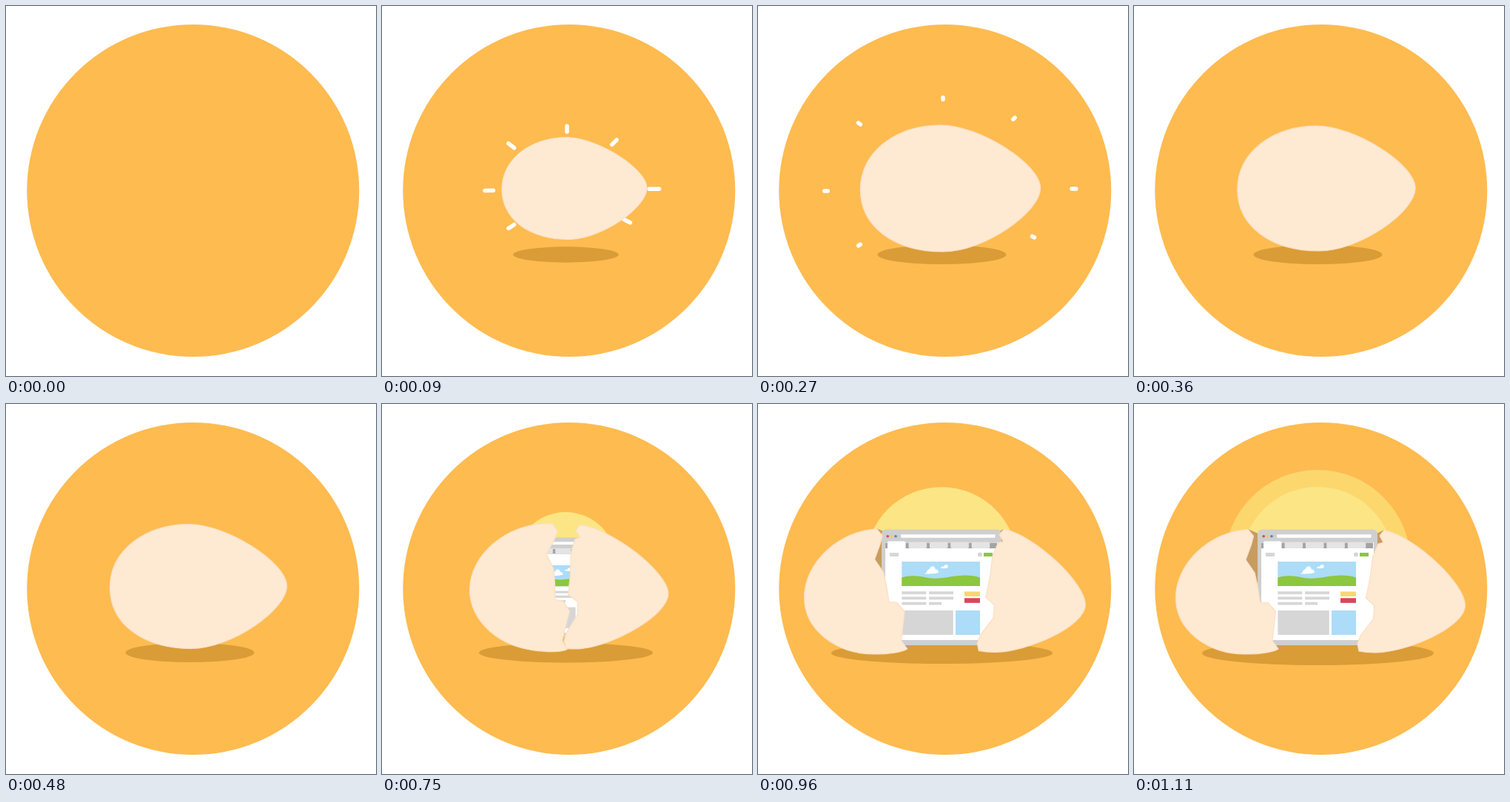
Recreate the animation shown at these times as an HTML page. Size 500 by 500 pixels, loop 2160 ms.

```html
<!DOCTYPE html>
<html lang="en">
<head>
<meta charset="utf-8">
<title>Hatching page</title>
<style>
  html, body { margin: 0; width: 100%; height: 100%; overflow: hidden; background: #fff; }
  svg { display: block; width: 100vw; height: 100vh; }
  .shell { fill: #fee9d2; stroke: #fbe0c3; stroke-width: 1.2; stroke-linejoin: round; }
  .inside { fill: #c79c63; }
  .grey { fill: #d6d6d6; }
  .white { fill: #fff; }
  .sky { fill: #acdcf7; }
  .green { fill: #8dc63f; }
  #rays { stroke: #fff; stroke-width: 5.5; stroke-linecap: round; }
</style>
</head>
<body>
<svg viewBox="0 0 500 500">
  <clipPath id="upper"><rect width="500" height="250"/></clipPath>
  <circle cx="252.8" cy="249.5" r="224.5" fill="#febb50"/>
  <ellipse id="shadow" cx="248.5" fill="#da9c36"/>

  <g id="whole">
    <g id="rays"></g>
    <path id="egg" class="shell" d="M140.5 248C140.5 197 189 162.5 247 162.5C298 162.5 379.5 214 379.5 246C379.5 278 305 330.5 250 330.5C185 330.5 140.5 297 140.5 248Z"/>
  </g>

  <g id="hatch">
    <g clip-path="url(#upper)">
      <circle id="outerGlow" cx="248" cy="215" fill="#fcd76d"/>
      <circle id="innerGlow" cx="248" cy="215" fill="#fce584"/>
    </g>
    <path class="left inside" d="M154 169L170 176L174 240L204 326L195 332L187 320L164 260L150 210Z"/>
    <path class="right inside" d="M338 170L326 176L322 240L298 326L304 334L312 305L337 188Z"/>

    <g id="page">
      <rect x="167" y="169.5" width="162" height="156.5" rx="6" fill="#cfcfcf"/>
      <rect class="white" x="172" y="187" width="152" height="132"/>
      <g id="dots"></g>
      <rect class="white" x="193" y="176.3" width="127.5" height="4.4" rx="1"/>
      <rect x="172" y="187.5" width="151" height="7.5" fill="#a3a3a3"/>
      <g id="tabs" fill="#e4e4e4"></g>
      <rect class="white" x="175" y="185.5" width="24.5" height="11" rx="2"/>
      <rect class="grey" x="178" y="201" width="12" height="5"/>
      <circle class="grey" cx="300" cy="203.5" r="3"/>
      <rect class="green" x="305" y="201" width="12" height="5"/>
      <rect class="sky" x="194.3" y="213" width="105.7" height="33"/>
      <path class="green" d="M194.3 234.5C206 231 216 232 230 235C252 239 274 226 300 234.5V246H194.3Z"/>
      <path class="white" d="M225 229.5Q228 228 228.5 225.5Q230 222.5 232 223Q233 218.5 237 219.5Q240 221 239.5 223.5Q244 223 244 228Q237 230 225 229.5Z"/>
      <path class="white" d="M246.5 221.5Q248 219 251 219.5Q252 216.5 255 217Q258 219 256 221.5Q251 223 246.5 221.5Z"/>
      <g id="lines" class="grey"></g>
      <rect x="279" y="253.5" width="21" height="6.5" fill="#f9d675"/>
      <rect x="279" y="262.3" width="21" height="6.5" fill="#d9475a"/>
      <rect class="grey" x="194.3" y="279" width="69.5" height="33"/>
      <rect class="sky" x="267" y="279" width="33" height="33"/>
    </g>

    <path class="left shell" d="M154 169.5L161.5 178.5L158.5 190L151 210.5L163 228L167 246L170.5 268L181 268.5L191.5 280.5L187 320L195 331C185 337 165 338 150 338C100 338 56.5 306 56.5 262C56.5 214 104 172 154 169.5Z"/>
    <path class="right shell" d="M338 170.5L332 178L337 187L330 189L322.5 207L319 235L313.5 262L325 273L323.5 290L306 313L302 324L304 334Q314 336 325 336C368 336 447.5 302 447.5 272C447.5 243.500 381 179.500 338 170.500Z"/>
  </g>
</svg>
<script>
const LOOP = 2160, STEP = 30, HATCH = 660;
const $ = s => document.querySelector(s);
const mix = (a, b, k) => a + (b - a) * k;
const span = (t, from, to) => Math.min(1, Math.max(0, (t - from) / (to - from)));
const easeOut = u => 1 - (1 - u) ** 2;
// Soft start set by lag, sharper settling with a higher pull
const ease = (u, lag, pull) => 1 - (1 - u ** lag) ** pull;

function set(target, attrs) {
  const el = typeof target === 'string' ? $(target) : target;
  for (const name in attrs) el.setAttribute(name, attrs[name]);
  return el;
}
const add = (parent, tag, attrs = {}) =>
  $(parent).appendChild(set(document.createElementNS('http://www.w3.org/2000/svg', tag), attrs));
const pose = (x, y, dx, dy, turn, size) =>
  `translate(${x + dx} ${y + dy}) rotate(${turn}) scale(${size}) translate(${-x} ${-y})`;

['#d9475a', '#f4c95b', '#3e8fc4'].forEach((fill, i) =>
  add('#dots', 'circle', { cx: 175.2 + i * 5.4, cy: 178.7, r: 1.8, fill }));
for (let i = 0; i < 4; i++)
  add('#tabs', 'rect', { x: 203.5 + i * 28.4, y: 186.5, width: 24.6, height: 8.5, rx: 1.5 });
for (let i = 0; i < 6; i++)
  add('#lines', 'rect', { x: 194.3 + i % 2 * 36.7, y: 253.3 + (i >> 1) * 7.2, width: i < 5 ? 33 : 17, height: 3.8 });

// Where the rays end, seen from the middle of the egg
const rays = [[0, -123], [96, -96], [177, -1], [122, 64], [-113, 75], [-158, 2], [-113, -89]].map(([x, y]) => ({
  el: add('#rays', 'line'), reach: Math.hypot(x, y), angle: Math.atan2(y, x) * 180 / Math.PI
}));

// Final resting middle of each half, and how far from it the half starts
const halves = [
  { name: '.left', x: 174.5, y: 250, dx: 85.5, dy: -3, turn: 14, lift: -2, lag: 2, pull: 4 },
  { name: '.right', x: 320.5, y: 252, dx: -69.5, dy: -5, turn: -10, lift: -6, lag: 3, pull: 6.4 }
];

function drawEgg(t) {
  const size = 1 - Math.exp(-t / 70) * Math.cos(t * .0096);
  const spread = Math.min(1, size);
  set('#egg', { transform: pose(260, 246.5, 0, 0, 0, size) });
  set('#shadow', { rx: 87 * spread, ry: 13 * spread, cy: 336 });

  const k = easeOut(span(t, 30, 330));
  $('#rays').style.display = t >= 90 && t <= 300 ? '' : 'none';
  for (const { el, reach, angle } of rays) {
    const mid = reach * mix(.466, 1.022, k);
    const half = Math.max(.5, reach * mix(.133, .061, k) - 5.5) / 2;
    set(el, { x1: mid - half, x2: mid + half, transform: `translate(250 248) rotate(${angle})` });
  }
}

function drawHatch(t) {
  const u = span(t, 630, 1110);
  const unfold = ease(u, 2, 9);
  for (const h of halves) {
    const slide = ease(u, h.lag, h.pull), rest = 1 - slide;
    const bump = (4 * slide * rest) ** 2;
    const transform = pose(h.x, h.y, h.dx * rest, h.dy * rest + h.lift * bump, h.turn * (1 - unfold), 1 + .048 * bump);
    document.querySelectorAll(h.name).forEach(el => set(el, { transform }));
  }
  set('#shadow', { rx: mix(87, 156.5, easeOut(u)), ry: mix(13, 16.3, u * u), cy: 336 + .7 * u });
  set('#page', { transform: pose(248, 248, 0, 0, 0, mix(.75, 1, unfold)) });
  set('#innerGlow', { r: mix(42, 103, unfold) });
  set('#outerGlow', { r: mix(40, 126, u) });
  document.querySelectorAll('.inside').forEach(el => set(el, { opacity: span(t, 800, 960) }));
}

const start = performance.now();
function frame() {
  const t = Math.floor((performance.now() - start) % LOOP / STEP) * STEP;
  const open = t >= HATCH;
  $('#whole').style.display = open ? 'none' : '';
  $('#hatch').style.display = open ? '' : 'none';
  (open ? drawHatch : drawEgg)(t);
  requestAnimationFrame(frame);
}
frame();
</script>
</body>
</html>
```
